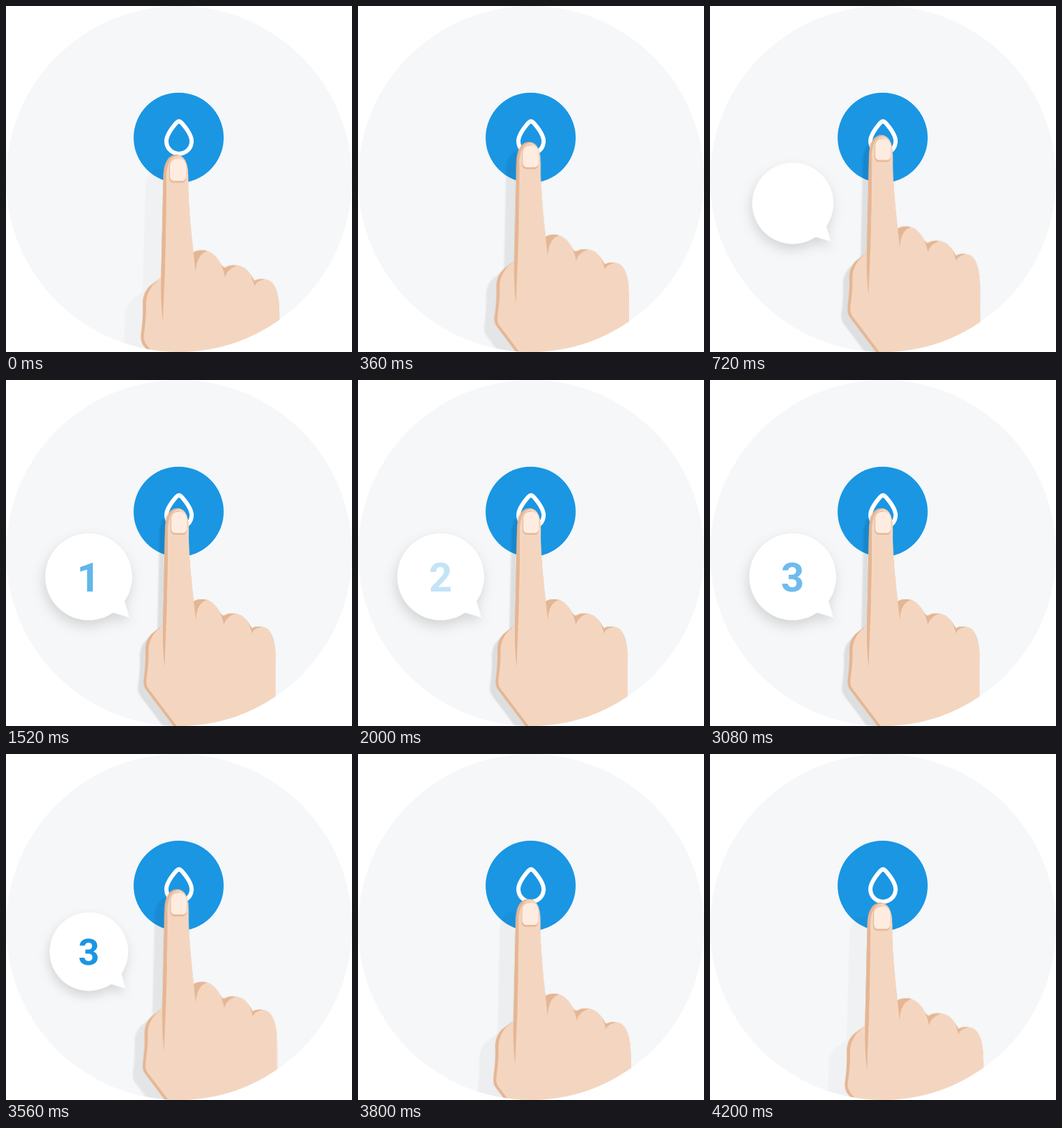
Animation, 494 px wide and 494 px high, one loop 4.24 s. Source, as an HTML page:

```html
<!DOCTYPE html>
<html lang="en">
<head>
<meta charset="utf-8">
<title>Press and count</title>
<style>
  html, body { margin: 0; width: 100%; height: 100%; overflow: hidden; background: #fff; }
  svg { display: block; width: 100%; height: 100%; }

  .hand, .shadow, .bubble, .digit { animation: 4240ms linear infinite both; }
  .hand { animation-name: press; transform-origin: 0 0; }
  .shadow { animation-name: cast; transform-origin: 0 0; filter: blur(.8px); }
  .bubble { animation-name: pop; transform-origin: 122px 293px; }
  .digit { animation-name: count; font: 700 58px Roboto, Arial, sans-serif; text-anchor: middle; fill: #1a96e3; }
  .two { animation-delay: 780ms; }
  .three { animation-name: last; }
  .body { filter: drop-shadow(-2px 8px 9px rgba(0, 0, 0, .14)); }

  @keyframes press {
    0% { transform: translate(-13.6px, 20.5px) scale(1.049); animation-timing-function: ease; }
    23.58% { transform: none; }
    79.72% { transform: none; animation-timing-function: ease; }
    99.06%, 100% { transform: translate(-13.6px, 20.5px) scale(1.049); }
  }
  @keyframes cast {
    0% { transform: translate(-39.6px, 40.5px) scale(1.049); opacity: .025; animation-timing-function: ease; }
    23.58% { transform: translate(-8px, 9px) scale(1); opacity: .1; }
    79.72% { transform: translate(-8px, 9px) scale(1); opacity: .1; animation-timing-function: ease; }
    99.06%, 100% { transform: translate(-39.6px, 40.5px) scale(1.049); opacity: .025; }
  }
  @keyframes pop {
    0%, 11.32% { transform: scale(0); animation-timing-function: cubic-bezier(.33, 1, .68, 1); }
    20.75% { transform: scale(1); }
    79.72% { transform: scale(1); animation-timing-function: cubic-bezier(.32, 0, .67, 0); }
    89.15%, 100% { transform: scale(0); }
  }
  @keyframes count {
    0%, 24.53% { opacity: 0; }
    41.04% { opacity: 1; }
    42.92%, 100% { opacity: 0; }
  }
  @keyframes last {
    0%, 61.32% { opacity: 0; }
    79.25%, 95% { opacity: 1; }
    95.01%, 100% { opacity: 0; }
  }
</style>
</head>
<body>
<svg viewBox="0 0 494 494">
  <defs>
    <clipPath id="disc"><circle cx="247" cy="247" r="247"/></clipPath>
    <path id="outline" d="M227 215C227 195 233 183 245 183C256 183 261 195 261 212L261 230
      C262 260 265 290 268 316C272 313 281 312 287 314C296 317 302 325 306 333Q309 338 312 336
      C318 332 329 332 337 337C344 342 348 349 351 354.500C357 351 365 351 372 354.500
      C382 361 385 380 385 398L385 570L296 570L199 441C196 436 196 430 197 424
      C199 410 199.500 395 199 386C199 372 205 364 212 359L224 350C225 310 226 260 227 215Z"/>
  </defs>

  <circle cx="247" cy="247" r="247" fill="#f5f7f9"/>
  <circle cx="246.500" cy="188" r="64.300" fill="#1a96e3"/>
  <path d="M243.500 166.500Q247 163 250.500 166.500C258 175 265 184 265 193A18 18 0 0 1 229 193C229 184 236 175 243.500 166.500Z"
    fill="none" stroke="#fff" stroke-width="6"/>

  <g class="bubble">
    <g class="body" fill="#fff">
      <circle cx="118" cy="281" r="62"/>
      <path d="M145 334L154 332.500L176 339L168 311L160 300Z"/>
    </g>
    <text class="digit" x="118" y="301.500">1</text>
    <text class="digit two" x="118" y="301.500">2</text>
    <text class="digit three" x="118" y="301.500">3</text>
  </g>

  <g clip-path="url(#disc)">
    <use class="shadow" href="#outline" fill="#000"/>
    <g class="hand" fill="#e5b694">
      <use href="#outline"/>
      <!-- lit skin -->
      <path fill="#f4d6c0" d="M231 216C231 197 236 185.500 247 184C257 185 261 197 261 212L261 230
        C262 260 265 290 268 316C272 313 281 312 287 314C296 317 302 325 306 333Q309 338 312 336
        C318 332 329 332 337 337C344 342 348 349 351 354.500C357 351 365 351 372 354.500
        C382 361 385 380 385 398L385 570L301 570L203 440C200 435 200 430 201 424
        C203 410 204 396 203.500 387C203.500 374 208 367 213 360L224 350L229 345C230 310 231 260 231 216Z"/>
      <!-- finger side and knuckle folds -->
      <path d="M224 350C225 310 226 260 227 215L231 215C231 260 230 310 229 345C228 370 227 395 226.500 411C224 390 223.500 370 224 350Z"/>
      <path d="M268 316C272 313 281 312 287 314C277 317 272 326 271 343Z"/>
      <path d="M305 331Q309 338 312 336C317 333 323 333 327 334C318 337 313 342 311 350C310 343 308 338 305 331Z"/>
      <path d="M346 346L351 354.500C355 352 360 351.500 365 352.500C357 354 353 357 351 362C350 357 348 351 346 346Z"/>
      <!-- nail -->
      <path d="M235 200C235 191 240 187 247 187L258 213C258 218 256 221 252 221L242 221C237 221 235 218 235 213Z"/>
      <path fill="#ffece1" d="M236 199C236 191 241 188 247 188C254 188 258 192 258 199L258 212C258 216 256 218.500 252 218.500L242 218.500C238 218.500 236 216 236 212Z"/>
    </g>
  </g>
</svg>
</body>
</html>
```
